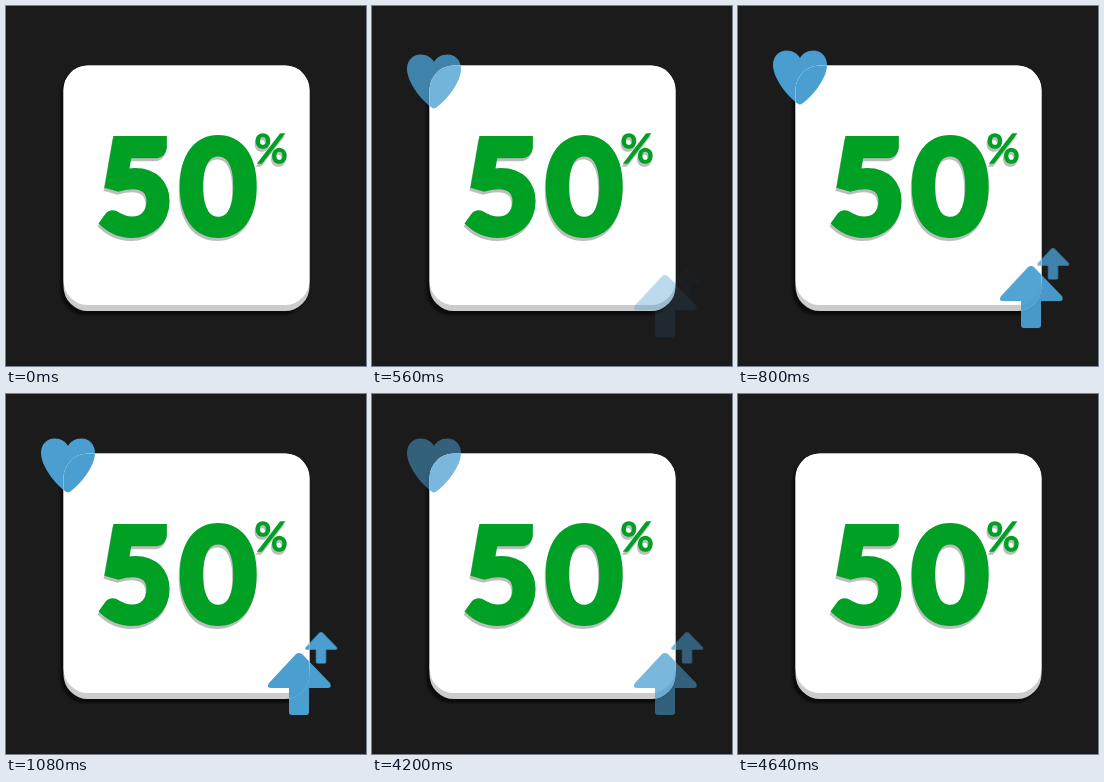
Write an HTML page without scripts that moves like this. It is 360 px wide and 360 px high and loops after 4720 ms.

```html
<!DOCTYPE html>
<html lang="en">
<head>
<meta charset="utf-8">
<title>50%</title>
<style>
  html, body { margin: 0; width: 100%; height: 100%; overflow: hidden; background: #1b1b1b; }
  svg { display: block; width: 100%; height: 100%; }

  .shadow { filter: blur(1px); }
  .offer {
    font-family: Lato, sans-serif; font-weight: 400; fill: #00a025; stroke: #00a025;
    filter: drop-shadow(-1px 3.5px 0 #bdbdbd);
  }

  .icons { fill: #4a9fd0; animation: leave 4.72s var(--leave) infinite; }
  .icon {
    animation: rise 4.72s cubic-bezier(.215, .61, .355, 1) var(--delay) infinite both,
               show 4.72s var(--show) var(--delay) infinite both;
  }
  /* Icons fade with more contrast over the dark ground than over the card. */
  .ground { --show: cubic-bezier(.9, 0, .1, 1); --leave: cubic-bezier(.35, .4, .25, 1); }
  .inside { --show: cubic-bezier(.5, 0, .3, 1); --leave: linear; }
  .heart { --delay: .2s; }
  .big { --delay: .32s; }
  .small { --delay: .44s; }

  @keyframes rise {
    0% { transform: translateY(45px); }
    13.56%, 100% { transform: none; }
  }
  /* Icons hide again before the staggered delays wrap into the next loop. */
  @keyframes show {
    0% { opacity: 0; }
    13.56%, 94.5% { opacity: 1; }
    94.6%, 100% { opacity: 0; }
  }
  @keyframes leave {
    0%, 86% { opacity: 1; }
    97.6%, 99.9% { opacity: 0; }
    100% { opacity: 1; }
  }
</style>
</head>
<body>
<svg viewBox="0 0 360 360">
  <defs>
    <path id="heart" d="M62 98.500C58 98.500 35 76 35 59C35 50 41 44.500 48.500 44.500C55 44.500 60 48 62 52C64 48 69 44.500 75.500 44.500C83 44.500 89 50 89 59C89 76 66 98.500 62 98.500Z"/>
    <path id="arrow" d="M-3 1Q0-1 3 1L31 30Q33 35 29 35H10V59Q10 62 7 62H-7Q-10 62-10 59V35H-28Q-33 35-30 30Z"/>
    <g id="bigArrow"><use href="#arrow" x="293" y="259"/></g>
    <g id="smallArrow"><use href="#arrow" transform="translate(315 238) scale(.51)"/></g>
    <rect id="base" x="57.500" y="59.500" width="246" height="245.500" rx="24.500"/>
    <clipPath id="cardClip"><use href="#base"/></clipPath>
  </defs>

  <use class="shadow" href="#base" x="-3" y="4" fill="#0c0c0c"/>

  <g class="icons ground">
    <use class="icon heart" href="#heart"/>
    <use class="icon big" href="#bigArrow"/>
    <use class="icon small" href="#smallArrow"/>
  </g>

  <use href="#base" fill="#ccc"/>
  <rect x="57.500" y="59.500" width="246" height="239.500" rx="24.500" fill="#fff"/>

  <g class="offer">
    <text x="93.500 176" y="225" font-size="125" stroke-width="12">50</text>
    <text x="248.500" y="157" font-size="41.500" stroke-width="1.500">%</text>
  </g>

  <g clip-path="url(#cardClip)">
    <g class="icons inside">
      <use class="icon heart" href="#heart"/>
      <use class="icon big" href="#bigArrow"/>
      <use class="icon small" href="#smallArrow"/>
    </g>
  </g>
</svg>
</body>
</html>
```
